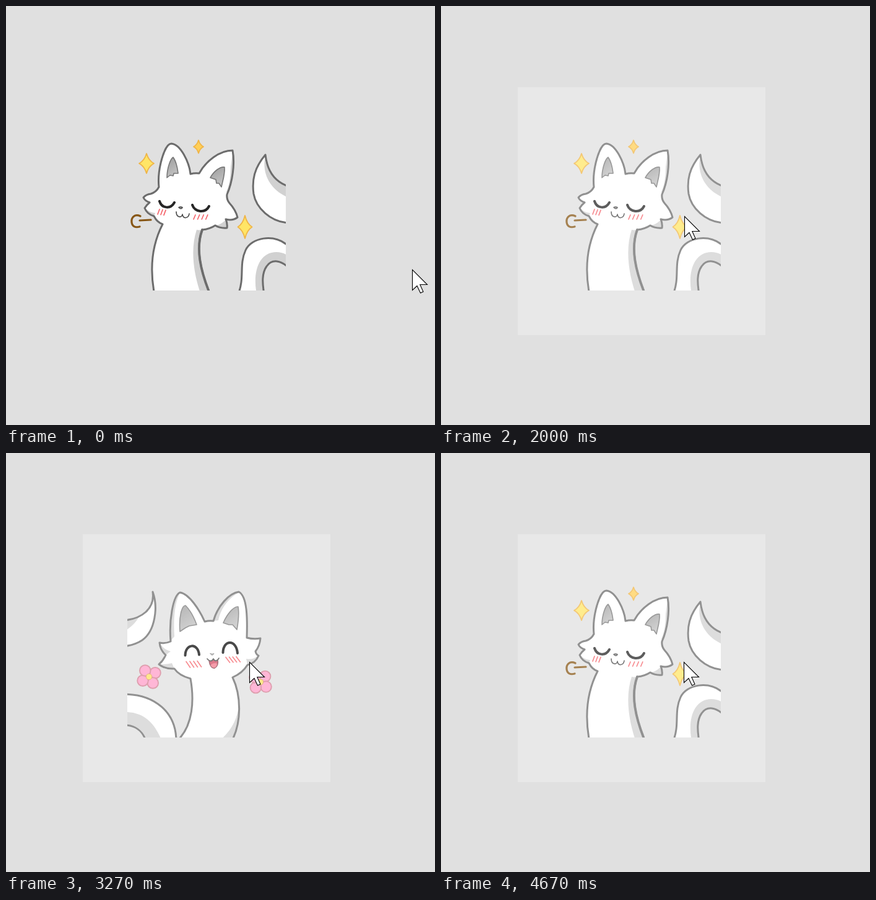
An HTML page for the animation above (4740 ms loop, 693 by 676 pixels).

```html
<!DOCTYPE html>
<html lang="en">
<head>
<meta charset="utf-8">
<title>Cat button</title>
<style>
  html, body { margin: 0; width: 100%; height: 100%; overflow: hidden; background: #e0e0e0; }
  svg { display: block; width: 693px; height: 676px; }
  path { fill: none; stroke-linecap: round; stroke-linejoin: round; }
  .fur { fill: #fff; }
  .shade { fill: #d1d1d1; }
  .line { stroke: #6c6c6c; stroke-width: 3; }
  .ear { fill: url(#ear); stroke: #777; stroke-width: 1.6; }
  .eye { stroke: #262626; stroke-width: 4; }
  .dark { stroke: #0c0c0c; }
  .mouth { stroke: #4c4c4c; stroke-width: 1.7; }
  .blush { stroke: #f4646b; stroke-width: 1.7; }
  .puff { stroke: #875615; stroke-width: 3.2; }
  .star { stroke: #efb548; stroke-width: 1.8; }
  .petal { fill: #ff9dc8; stroke: #d27f92; stroke-width: 1.9; }
  .core { fill: #ffe064; stroke: #d89562; stroke-width: 1; }
</style>
</head>
<body>
<svg viewBox="0 0 693 676" xmlns="http://www.w3.org/2000/svg">
  <defs>
    <clipPath id="frame"><rect x="196" y="203" width="256" height="256"/></clipPath>
    <linearGradient id="ear" x1="0" y1="0" x2="0.4" y2="1">
      <stop offset="0" stop-color="#9c9c9c"/><stop offset="1" stop-color="#c2c2c2"/>
    </linearGradient>
  </defs>
  <g clip-path="url(#frame)"><g id="calm"></g><g id="happy"></g></g>
  <rect id="veil" x="124" y="131" width="400" height="400" fill="#fff"/>
  <path id="cursor" d="M.5 .5V33.5L8 26.5L13.5 38L18 36L12.8 24.5H24.5Z"
    style="fill:#fff;stroke:#000;stroke-width:1.1;stroke-linejoin:miter"/>
</svg>
<script>
const $ = id => document.getElementById(id);
const path = (kind, d, extra = '') => `<path class="${kind}" d="${d}" ${extra}/>`;

// fill, then shading, then the outline on top
const part = (d, shades, edge = d) =>
  path('fur', d) + shades.map(s => path('shade', s)).join('') + path('line', edge);

const star = (x, y, rx, ry, fill) => {
  const q = (dx, dy, ex, ey) => `Q${x + dx * rx * .28} ${y + dy * ry * .28} ${x + ex * rx} ${y + ey * ry}`;
  return path('star', `M${x} ${y - ry}${q(1, -1, 1, 0)}${q(1, 1, 0, 1)}${q(-1, 1, -1, 0)}${q(-1, -1, 0, -1)}Z`, `style="fill:${fill}"`);
};

const flower = (x, y, turn) => {
  let out = '';
  for (let i = 0; i < 4; i++) {
    const a = (turn + i * 90) * Math.PI / 180;
    out += `<circle class="petal" cx="${x + 11.8 * Math.cos(a)}" cy="${y + 11.8 * Math.sin(a)}" r="8.8"/>`;
  }
  return out + `<circle class="core" cx="${x}" cy="${y}" r="4.8"/>`;
};

const blush = (x, y, n, gap, dx, dy, slope = 0) => {
  let d = '';
  for (let i = 0; i < n; i++) d += `M${x + i * gap} ${y + i * slope}l${dx} ${dy}`;
  return path('blush', d);
};

$('calm').innerHTML =
  part('M419 240C401 261 397 281 400 303C404 326 427 348 456 350V291C436 284 422 268 419 240Z',
    ['M418 246C414 274 429 298 456 309V290C436 284 422 268 418 246Z']) +
  part('M375 465C386 438 376 418 387 394C396 374 432 366 456 387V422C445 411 430 407 421 420C413 431 414 447 417 465Z',
    ['M405 465C398 430 408 397 437 397Q447 397 456 403V422C445 411 430 407 421 420C413 431 414 447 417 465Z'],
    'M375 465C386 438 376 418 387 394C396 374 432 366 456 387M456 422C445 411 430 407 421 420C413 431 414 447 417 465') +
  part('M240 466C232 425 236 385 253 352Q244 349 239 339Q228 336 224 326Q227 321 232 317Q224 314 222 309Q226 304 234 303Q243 300 247 292' +
    'C244 264 256 222 267 222C282 223 296 252 298 271Q305 269 312 270C323 250 345 233 366 233C370 254 366 284 357 304' +
    'Q356 312 361 318Q371 329 374 341Q366 347 355 344Q358 351 357 358Q346 359 338 354Q329 360 317 361C306 391 314 427 330 466Z',
    ['M308 361Q313 362 317 361C306 391 314 427 330 466H315C302 429 298 391 308 361Z',
     'M338 354Q347 353 354 346Q358 351 357 358Q346 359 338 354Z',
     'M224 326Q231 333 241 334L239 339Q228 336 224 326Z',
     'M363 260Q363 285 356 300L358 303C366 284 370 254 366 236Z']) +
  path('line', 'M317 361C306 391 314 427 330 466', 'style="stroke-width:3.8"') +
  path('ear', 'M260 277C260 261 266 246 270 244C276 252 277 262 278 270L271 270L270 274L265 273Z') +
  path('ear', 'M330 277C336 266 346 259 353 260C354 271 350 282 348 292L344 286L340 286L339 280Z') +
  path('eye', 'M248 315C252 327 266 328 272 317') +
  path('eye', 'M301 321C305 333 322 335 328 323') +
  path('mouth', 'M279 325Q282 323 285 325Q283 329 279 325Z', 'style="fill:#999"') +
  path('mouth', 'M275 332C275 341 284 343 285 336C286 344 295 343 296 335') +
  blush(248, 328, 3, 5, -3, 8, .7) + blush(306, 337, 4, 6.6, -3, 7) +
  path('puff', 'M217 339C208 335 202 341 203 349C204 356 209 358 216 356M216 346L234 345') +
  star(227, 254, 12, 16, '#ffe566') + star(311, 227, 8, 10.5, '#ffcf58') + star(386, 356.5, 11.5, 18.5, '#ffe566');

$('happy').innerHTML =
  part('M237 224C246 249 241 287 220 302Q208 310 190 312V270C218 268 241 252 237 224Z',
    ['M190 270Q203 270 215 264Q207 279 190 288Z']) +
  part('M190 389C240 389 275 418 275 465H226C221 448 208 439 190 439Z',
    ['M190 418C222 417 240 435 252 465H226C221 448 208 439 190 439Z'],
    'M190 389C240 389 275 418 275 465M226 465C221 448 208 439 190 439') +
  part('M276 465C303 440 304 397 298 364C287 361 278 357 272 348Q257 349 247 341Q254 335 258 326Q249 318 248 306Q257 308 266 304' +
    'C263 269 270 230 281 225C296 227 313 254 321 272Q328 270 335 271C342 246 361 226 376 224C390 231 390 268 389 298' +
    'Q400 301 411 299Q410 311 403 320Q404 325 408 327Q403 339 390 342Q382 355 366 362C380 391 381 435 364 466Z',
    ['M377 403C374 432 362 450 343 466H364C377 440 379 423 377 403Z',
     'M281 226C273 240 270 266 272 296L266 303C263 269 270 230 281 226Z',
     'M376 225C360 234 347 250 343 270L335 271C342 246 361 226 376 225Z',
     'M250 309Q255 317 266 320L258 326Q251 320 250 309Z',
     'M249 341Q261 341 268 339L272 348Q258 349 249 341Z',
     'M388 332Q398 334 406 328Q402 339 390 341Z']) +
  path('ear', 'M281 288C279 264 284 246 290 246C299 255 304 266 308 277L296 279L290 282Z') +
  path('ear', 'M351 274C357 260 368 247 375 248C377 261 375 274 373 285L366 277L360 277Z') +
  path('eye dark', 'M289.500 326.500C290 307 310 306 312 325.500') +
  path('eye dark', 'M350.500 322C351 301 372 300 374 323') +
  path('mouth', 'M330 323.500Q333 325 336 323.500Q333 329 330 323.500Z', 'style="fill:#aaa;stroke:#888;stroke-width:1"') +
  path('mouth', 'M328 335C329 343 333 348 337 347C341 345 343 340 342 334Q338 337 335 333Q332 337 328 335Z', 'style="fill:#d24c64;stroke:#8c4552"') +
  path('fur', 'M330.500 342Q336 337 341 340Q340 346 336 346.500Q332 346 330.500 342Z', 'style="fill:#f17b8d"') +
  path('mouth', 'M325 332Q331 339 335 332Q339 339 344 331') +
  blush(291, 336.500, 4, 6, 6.5, 9.5, -.3) + blush(355, 329.500, 4, 5.600, 6.5, 8.5, -.3) +
  flower(231, 361, -32) + flower(411, 369.500, -50);

// [time, cursor x, cursor y]
const moves = [
  [0, 656, 425], [470, 640, 419], [530, 592, 401], [600, 516, 377], [670, 437, 357],
  [730, 381, 345], [800, 350, 339], [870, 343, 338],
  [1270, 359, 338], [1330, 418, 340], [1400, 500, 343], [1470, 560, 345], [1530, 581, 345],
  [1730, 565, 345], [1800, 509, 343], [1870, 442, 341], [1930, 403, 339], [2000, 393, 339],
  [2270, 393, 337], [4330, 392, 337]
];
// [press, release]: each release swaps the picture
const clicks = [[2530, 2670], [2870, 3000], [3200, 3270], [3530, 3600], [3800, 3870], [4070, 4130], [4330, 4470], [4600, 4670]];
const loop = 4740, start = performance.now();

function draw(now) {
  const t = Math.max(0, now - start) % loop;
  const [, x, y] = moves.filter(m => m[0] <= t).pop();
  const over = x >= 124 && x < 524 && y >= 131 && y < 531;
  const down = clicks.some(([a, b]) => t >= a && t < b);
  const happy = clicks.filter(c => c[1] <= t).length % 2 === 1;
  $('calm').style.display = happy ? 'none' : '';
  $('happy').style.display = happy ? '' : 'none';
  $('veil').setAttribute('opacity', down ? .38 : over ? .25 : 0);
  $('cursor').setAttribute('transform', `translate(${x} ${y})`);
  requestAnimationFrame(draw);
}
draw(start);
</script>
</body>
</html>
```
